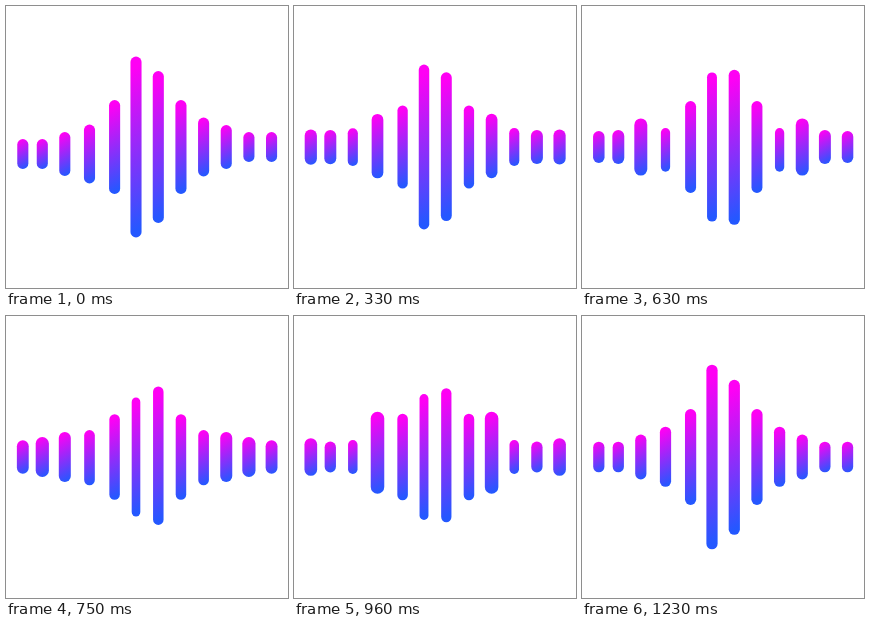
These frames come from a looping animation (282x282 px, 1.26 s). An HTML page:

```html
<!DOCTYPE html>
<html>
<head>
<meta charset="utf-8">
<title>Sound bars</title>
<style>
  html, body { margin: 0; width: 100%; height: 100%; overflow: hidden; background: #fff; }
  svg { display: block; width: 100vw; height: 100vh; }
</style>
</head>
<body>
<svg id="stage" viewBox="0 0 282 282"></svg>
<script>
const LOOP = 1260, STEP = 30, END = 1230;
const MIDDLE = 141, WIDTH = 11.1, FIRST_X = 152.3, GAP = 22.65;
const TILT = 28 * Math.PI / 180;

// Each voice rests at height h and swings through a few [time, scale] beats.
// lift raises the centre as the bar grows.
const mid = { h: 152, lift: -15, beats: [[210, 1.01], [480, .935], [630, 1.02], [840, .84]] };
const tall = { h: 181, beats: [[210, .875], [480, .96], [840, .6]] };

// Mirrored pairs, from the centre outwards; left is the x of the left twin.
const pairs = [
  { left: 108.6, h: 94, beats: [[210, .78], [480, 1.03], [840, .89]] },
  { left: 83.5, h: 59, lift: 11, beats: [[210, 1.18], [630, .74], [960, 1.39]] },
  { left: 58.8, h: 44, beats: [[210, .75], [630, 1.3], [960, .77]] },
  { left: 36.3, h: 30, beats: [[210, 1.26], [480, .97], [840, 1.4], [960, 1.03]] },
  { left: 16.8, h: 30, beats: [[210, 1.2], [630, 1.06], [960, 1.25]] }
];

const ease = u => u * u * (3 - 2 * u);

function scaleAt(beats, t) {
  let [t0, s0] = [0, 1];
  for (const [t1, s1] of [...beats, [END, 1.02]]) {
    if (t <= t1) return s0 + (s1 - s0) * ease((t - t0) / (t1 - t0));
    [t0, s0] = [t1, s1];
  }
  return s0;
}

const stage = document.getElementById("stage");
const bars = [];

function make(name, parent, attrs) {
  const el = document.createElementNS("http://www.w3.org/2000/svg", name);
  parent.appendChild(el);
  return set(el, attrs);
}

function set(el, attrs) {
  for (const key in attrs) el.setAttribute(key, attrs[key]);
  return el;
}

function addBar(x, voice, drop = 0) {
  const id = "ink" + bars.length;
  const ink = make("linearGradient", stage, { id, gradientUnits: "userSpaceOnUse" });
  make("stop", ink, { offset: .07, "stop-color": "#ff00f4" });
  make("stop", ink, { offset: .95, "stop-color": "#2458ff" });
  const el = make("rect", stage, { fill: `url(#${id})` });
  bars.push({ x, drop, ink, el, lift: 0, ...voice });
}

addBar(130, tall);
addBar(FIRST_X, mid);
pairs.forEach((pair, i) => {
  addBar(pair.left, pair, i > 0 ? 7 : 0);
  addBar(FIRST_X + GAP * (i + 1), pair);
});

function draw(t) {
  const settle = 1 - ease(Math.min(1, t / 360));
  for (const bar of bars) {
    const s = scaleAt(bar.beats, t);
    const w = WIDTH * Math.pow(s, .6), h = bar.h * s;
    const x = bar.x, y = MIDDLE - bar.lift * (s - 1) + bar.drop * settle;
    set(bar.el, { x: x - w / 2, y: y - h / 2, width: w, height: h, rx: w / 2 });

    // Tilted gradient line that just reaches the corners.
    const reach = (w * Math.sin(TILT) + h * Math.cos(TILT)) / 2;
    const dx = reach * Math.sin(TILT), dy = reach * Math.cos(TILT);
    set(bar.ink, { x1: x - dx, y1: y - dy, x2: x + dx, y2: y + dy });
  }
}

const start = performance.now();
function tick() {
  const t = (performance.now() - start) % LOOP;
  draw(Math.floor(t / STEP) * STEP);
  requestAnimationFrame(tick);
}
tick();
</script>
</body>
</html>
```
